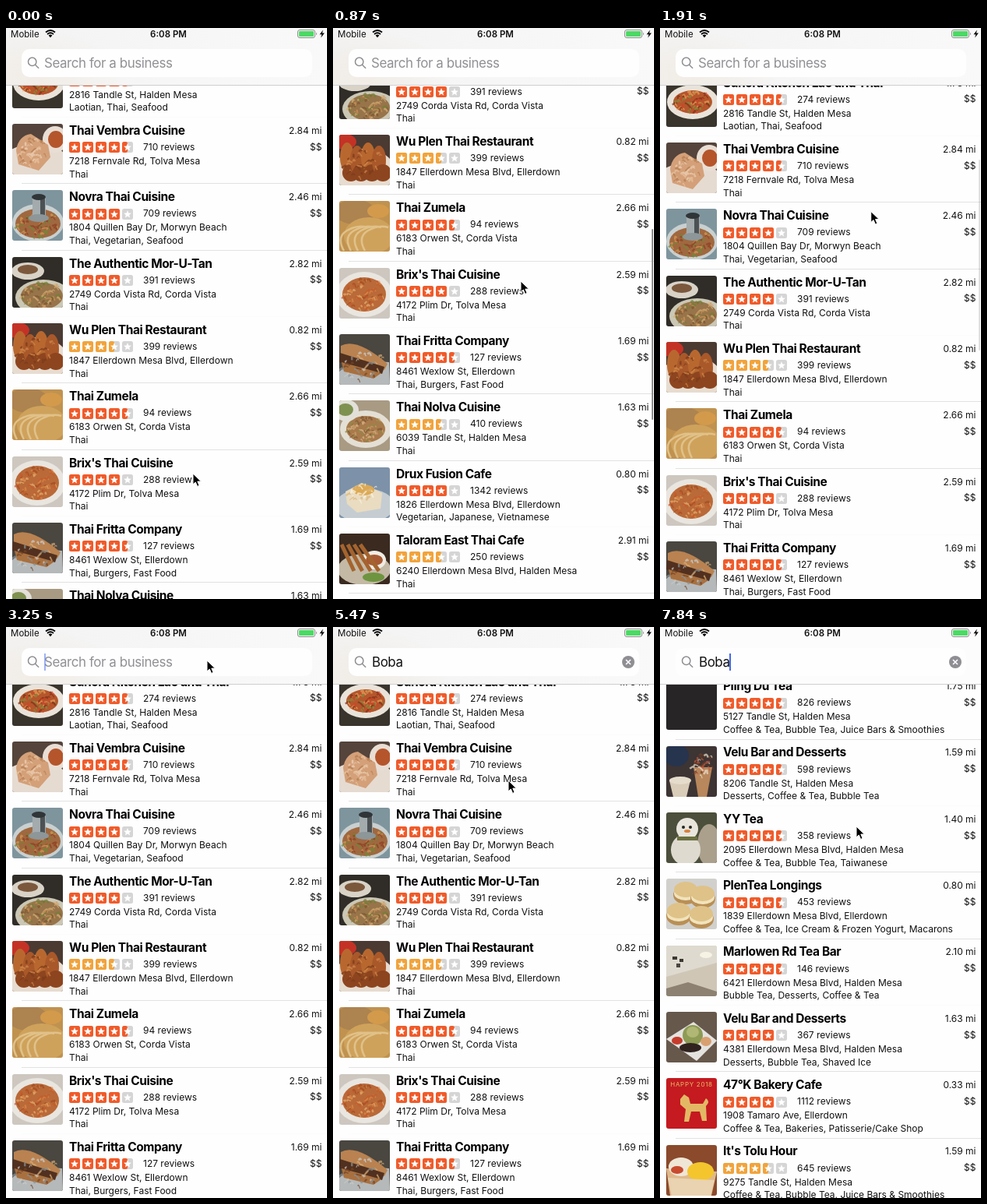
An HTML page for the animation above (7.99 s loop, 412 by 733 pixels).

```html
<!DOCTYPE html>
<html lang="en">
<head>
<meta charset="utf-8">
<title>Business search</title>
<style>
html, body { margin: 0; width: 100%; height: 100%; overflow: hidden; background: #fefefe; }
body { position: relative; font: 12px/20px Inter, Roboto, sans-serif; color: #111; }
body * { box-sizing: border-box; }
.abs, .row, .row > *, #header > * { position: absolute; white-space: pre; }
.row { left: 0; width: 412px; height: 85.333px; }
.thumb { left: 8px; top: 8.8px; width: 65px; height: 65px; border-radius: 3px; overflow: hidden; }
.name { left: 81px; top: 7.6px; font-size: 15.5px; font-weight: 700; letter-spacing: -.42px; color: #000; }
.stars { left: 81px; top: 32px; width: 82px; height: 14px; }
.reviews { left: 176px; top: 28.8px; }
.address { left: 81px; top: 46.8px; }
.kinds { left: 81px; top: 63.3px; }
.miles { right: 6.5px; top: 7.6px; }
.price { right: 6.5px; top: 28.4px; }
.rule { left: 20px; right: 0; height: 1px; background: #e2e2e2; }
#bar { left: 408.5px; width: 2.5px; height: 245px; border-radius: 2px; background: #8c8c8c; }
#header { left: 0; top: 0; width: 412px; height: 74px; border-bottom: 1px solid #cfcfcf; background: #fcfcfc; }
#tint { left: 0; top: 0; width: 412px; height: 73px;
  background: radial-gradient(110px 60px at 40px 62px, #f1ece5, #f1ece500), linear-gradient(90deg, #f3f3f3, #f9f9f9); }
#field { left: 20px; top: 27px; width: 373px; height: 36px; border-radius: 10px; background: #fefefe; }
#hint, #query { left: 50px; top: 33.5px; font-size: 16.9px; line-height: 23px; letter-spacing: -.41px; }
#hint { left: 49px; color: #909095; }
#caret { display: inline-block; width: 2px; height: 22px; margin-left: -1px; vertical-align: top; background: #4468ea; }
</style>
</head>
<body>
<div id="thai" class="abs"></div>
<div id="boba" class="abs"></div>
<div id="bar" class="abs"></div>
<div id="header" class="abs">
  <div id="tint"></div>
  <div id="field"></div>
  <div style="left:6px;top:-2.5px;font-size:11.5px">Mobile</div>
  <div style="left:0;width:417px;top:-2.5px;text-align:center;font-size:11.5px;font-weight:600">6:08 PM</div>
  <svg width="412" height="73" fill="none" style="left:0;top:0">
    <path d="M51 5.5q6-5 12 0M53 8q4-3.4 8 0" stroke="#000" stroke-width="1.8"/>
    <path d="M54.6 9.6q2.4-2 4.8 0L57 12.2z" fill="#000"/>
    <rect x="374.5" y="2.5" width="22" height="10" rx="2.5" stroke="#8a8a8a"/>
    <rect x="376" y="4" width="19" height="7" rx="1.2" fill="#4cd964"/>
    <path d="M398 5.5q2 2 0 4z" fill="#8a8a8a"/>
    <path d="M407 2.5l-4.5 5.7h2.8l-1.1 4.4 4.6-6h-2.9z" fill="#000"/>
    <g stroke="#8e8e93" stroke-width="1.5"><circle cx="33.7" cy="43.3" r="5.2"/><path d="M37.5 47.2l4.6 4.6"/></g>
    <g id="clear"><circle cx="379" cy="45" r="8" fill="#8e8e93"/><path d="M376 42l6 6m0-6l-6 6" stroke="#fff" stroke-width="1.6"/></g>
  </svg>
  <div id="hint">Search for a business</div>
  <div id="query"><span id="typed"></span><i id="caret"></i></div>
</div>
<svg id="cursor" class="abs" width="14" height="20" viewBox="-1 -1 14 20" style="left:-1px;top:-1px">
  <path d="M0 0v14l3.3-3 2.3 5.4 2.5-1-2.3-5.3h4.6z" stroke="#fff"/>
</svg>
<script>
const $ = id => document.getElementById(id);
const LOOP = 7990, STEP = 148, PITCH = 256 / 3, FIRST_TOP = -227.1;

const blob = (fill, x, y, rx, ry = rx) => `<ellipse cx="${x}" cy="${y}" rx="${rx}" ry="${ry}" fill="${fill}"/>`;
const box = (fill, x, y, w, h) => `<rect x="${x}" y="${y}" width="${w}" height="${h}" fill="${fill}"/>`;
const fill = color => box(color, 0, 0, 65, 65);
const shape = (color, d) => `<path d="${d}" fill="${color}"/>`;

// Short curved strokes scattered over an ellipse, coloured in turn.
function strands(colors, x, y, rx, ry, count = 60) {
  let seed = 7, out = '';
  const random = () => (seed = seed * 16807 % 2147483647) / 2147483647;
  random();
  for (let i = 0; i < count; i++) {
    const angle = random() * 6.283, reach = Math.sqrt(random());
    const px = x + Math.cos(angle) * reach * rx, py = y + Math.sin(angle) * reach * ry;
    out += `<path d="M${px} ${py}q${random() * 8 - 4} -4 ${random() * 12 - 6} ${random() * 6 - 2}"
      stroke="${colors[i % colors.length]}" stroke-width="${1 + random() * 1.6}"/>`;
  }
  return `<g fill="none" opacity=".7">${out}</g>`;
}
const dish = (table, plate, food, colors, x = 32, y = 37, rx = 25, ry = 18) =>
  fill(table) + blob(plate, x, y, rx + 8, ry + 7) + blob(food, x, y, rx, ry) + strands(colors, x, y, rx - 2, ry - 2);

const thai = [
  ['Sunora Kitchen Lao and Thai', 4.5, 274, '1.73', '2816 Tandle St, Halden Mesa', 'Laotian, Thai, Seafood',
    dish('#39342c', '#e9e3da', '#b5562c', ['#d8402a', '#e8a35a', '#7d9440', '#7e3018'], 34, 33, 25, 15)],
  ['Thai Vembra Cuisine', 4.5, 710, '2.84', '7218 Fernvale Rd, Tolva Mesa', 'Thai',
    fill('#54443b') + blob('#e6dbd1', 30, 50, 42, 25) + blob('#e9ded4', 55, 20, 16, 17) + blob('#b5552c', 56, 20, 10, 11) +
    shape('#d3a079', 'M5 34Q8 15 24 13L46 27 49 43 34 60 8 52z') + strands(['#e9c5a1', '#b57a4d', '#f0d4ba'], 26, 37, 17, 18, 44)],
  ['Novra Thai Cuisine', 4, 709, '2.46', '1804 Quillen Bay Dr, Morwyn Beach', 'Thai, Vegetarian, Seafood',
    fill('#7f959e') + blob('#c9d0d0', 33, 42, 33, 24) + blob('#a0683f', 33, 43, 29, 19) +
    strands(['#6e8a3a', '#d89a58', '#8c3d24'], 33, 45, 27, 16) + box('#a3abad', 26, 8, 17, 28) + box('#4c5254', 36, 10, 6, 26) +
    blob('#8d9698', 34, 36, 13, 5) + blob('#303538', 34, 9, 9, 4)],
  ['The Authentic Mor-U-Tan', 4, 391, '2.82', '2749 Corda Vista Rd, Corda Vista', 'Thai',
    fill('#302d28') + blob('#d8d2c7', 20, 18, 21, 11) + blob('#7b583c', 20, 16, 13, 6) +
    blob('#cbc7b5', 40, 52, 36, 23) + blob('#98744a', 38, 50, 27, 17) + strands(['#cf9458', '#6f8036', '#7c5530', '#d7b27a'], 38, 49, 26, 16)],
  ['Wu Plen Thai Restaurant', 3.5, 399, '0.82', '1847 Ellerdown Mesa Blvd, Ellerdown', 'Thai',
    fill('#4b3a32') + blob('#e7dcd0', 32, 48, 40, 30) + blob('#c43226', 7, 9, 15, 10) +
    [10, 23, 37, 51].map((x, i) => blob(i % 2 ? '#a9582a' : '#b8682f', x, 29 + i % 2 * 4, 9, 19) + blob('#8d451f', x + 5, 49, 11, 11)).join('') +
    strands(['#d28a4c', '#7a3a1a'], 32, 38, 26, 18, 30)],
  ['Thai Zumela', 4.5, 94, '2.66', '6183 Orwen St, Corda Vista', 'Thai',
    fill('#c0924f') + blob('#ad8350', 20, 14, 26, 16) + blob('#cfa25c', 38, 45, 32, 24) +
    [0, 9, 18, 27].map(x => `<path d="M${x + 6} 64q-10-18 4-26t26-4" fill="none" stroke="#e0c189" stroke-width="2.5"/>`).join('') +
    blob('#d39a4c', 50, 13, 14, 9)],
  ['Brix\'s Thai Cuisine', 4, 288, '2.59', '4172 Plim Dr, Tolva Mesa', 'Thai',
    dish('#cdc7c0', '#e9e5df', '#b96a38', ['#e08a48', '#a44a20', '#e9b273', '#c7592c'], 32, 34, 28, 22)],
  ['Thai Fritta Company', 4.5, 127, '1.69', '8461 Wexlow St, Ellerdown', 'Thai, Burgers, Fast Food',
    fill('#4a4640') + shape('#b5b9ba', 'M0 48L18 33 64 36 65 65H0z') + shape('#b98250', 'M2 15Q22 4 62 38L58 46 2 27z') +
    shape('#51301f', 'M1 24L58 42 55 51 0 36z') + shape('#a9703f', 'M3 36L54 50 44 57 6 48z') +
    strands(['#dfb27a', '#ccc', '#724326', '#8a9092'], 32, 42, 30, 18, 34)],
  ['Thai Nolva Cuisine', 3.5, 410, '1.63', '6039 Tandle St, Halden Mesa', 'Thai',
    dish('#a99a83', '#e4dfd4', '#a87a4c', ['#cda06a', '#7e5634', '#ddb98a', '#8e8a4a'], 34, 37, 25, 17) + blob('#e2e0d8', 9, 13, 16, 14) + blob('#7f9150', 8, 12, 10, 8)],
  ['Drux Fusion Cafe', 4, 1342, '0.80', '1826 Ellerdown Mesa Blvd, Ellerdown', 'Vegetarian, Japanese, Vietnamese',
    fill('#7d92a8') + blob('#c5cdd2', 33, 49, 38, 22) + shape('#e9dcc1', 'M8 31L29 20 55 33 53 53 23 58 10 47z') +
    blob('#dca954', 31, 29, 14, 7) + strands(['#fbf6e4', '#dcb77a'], 31, 33, 19, 11, 24)],
  ['Taloram East Thai Cafe', 3.5, 250, '2.91', '6240 Ellerdown Mesa Blvd, Halden Mesa', 'Thai',
    fill('#3a2a20') + blob('#c3b9a5', 32, 46, 34, 20) + blob('#f0ece4', 45, 34, 15, 12) + blob('#a85a34', 45, 34, 11, 7) +
    [0, 8, 16, 24].map(x => `<path d="M${x + 3} 14l${16 + x / 3} 34" stroke="#a4642f" stroke-width="5"/>`).join('') + blob('#6e9440', 44, 56, 14, 6)],
];

const boba = [
  ['Pling Du Tea', 4.5, 826, '1.75', '5127 Tandle St, Halden Mesa', 'Coffee & Tea, Bubble Tea, Juice Bars & Smoothies', fill('#272525')],
  ['Velu Bar and Desserts', 4.5, 598, '1.59', '8206 Tandle St, Halden Mesa', 'Desserts, Coffee & Tea, Bubble Tea',
    fill('#3d3434') + blob('#27344e', 13, 12, 16, 14) + shape('#d9ccb8', 'M4 44h27l-5 21H9z') + blob('#e6dccb', 18, 44, 14, 5) +
    shape('#b8875c', 'M35 27h24l-7 38H41z') + strands(['#eee2cf', '#6d3c25', '#c45b3c'], 47, 25, 13, 14, 35)],
  ['YY Tea', 4.5, 358, '1.40', '2095 Ellerdown Mesa Blvd, Halden Mesa', 'Coffee & Tea, Bubble Tea, Taiwanese',
    fill('#4b4f3b') + blob('#aaa08c', 55, 42, 15, 27) + blob('#dedacf', 25, 48, 19, 20) + blob('#e8e5dc', 27, 21, 14, 14) +
    box('#6b7040', 14, 31, 26, 5) + blob('#252521', 22, 19, 2) + blob('#252521', 31, 19, 2) + blob('#d7823c', 27, 24, 4, 2)],
  ['PlenTea Longings', 4.5, 453, '0.80', '1839 Ellerdown Mesa Blvd, Ellerdown', 'Coffee & Tea, Ice Cream & Frozen Yogurt, Macarons',
    fill('#d1d0cc') + [[25, 17], [47, 22], [16, 44], [45, 48]].map(([x, y]) =>
      blob('#b98f55', x, y + 4, 16, 12) + blob('#f1e3bd', x, y + 2, 15, 9) + blob('#dfc287', x, y - 3, 15, 10)).join('')],
  ['Marlowen Rd Tea Bar', 4.5, 146, '2.10', '6421 Ellerdown Mesa Blvd, Halden Mesa', 'Bubble Tea, Desserts, Coffee & Tea',
    fill('#cfc6b6') + shape('#dedacf', 'M0 0h65v22L0 40z') + box('#3b3833', 8, 14, 6, 4) + box('#3b3833', 17, 17, 5, 4) +
    box('#4a4640', 13, 23, 5, 5) + shape('#8d8272', 'M0 55l28-8 37 12v6H0z') + blob('#f7f3e4', 51, 12, 8, 4)],
  ['Velu Bar and Desserts', 4, 367, '1.63', '4381 Ellerdown Mesa Blvd, Halden Mesa', 'Desserts, Bubble Tea, Shaved Ice',
    fill('#67584c') + shape('#e4e2de', 'M0 35L35 13 65 37 39 63z') + blob('#8d9b54', 34, 30, 13, 13) + blob('#b0b673', 34, 26, 8, 7) +
    blob('#30231f', 31, 46, 14, 6) + blob('#c53c2b', 14, 37, 7, 5) + blob('#d8a070', 51, 38, 7, 6)],
  ['47°K Bakery Cafe', 4, 1112, '0.33', '1908 Tamaro Ave, Ellerdown', 'Coffee & Tea, Bakeries, Patisserie/Cake Shop',
    fill('#c41a20') + '<text x="32.5" y="11" text-anchor="middle" font-size="8" letter-spacing=".7" fill="#e5bd6a">HAPPY 2018</text>' +
    shape('#e3b865', 'M18 27l5-6 6 4 2 8h16l4-7q6 4 0 10l1 19h-6l-3-12H32l-3 13h-6l2-16-7-6z')],
  ['It\'s Tolu Hour', 3.5, 645, '1.59', '9275 Tandle St, Halden Mesa', 'Coffee & Tea, Bubble Tea, Juice Bars & Smoothies',
    fill('#8b4a2c') + shape('#dfb98c', 'M0 30l65 4-7 31H5z') + blob('#efe6d6', 19, 28, 16, 12) + blob('#f4c52c', 44, 34, 17, 12) +
    blob('#c84b2e', 14, 32, 8, 5) + shape('#e9d3b0', 'M2 42l60 3-5 20H7z')],
  ['The Valdo Coffee House', 4.5, 274, '0.20', '9718 Norvane Ave, Ellerdown', 'Coffee & Tea',
    fill('#3b332c') + shape('#9db4bf', 'M0 0h30L18 20 0 24z') + box('#98653c', 0, 25, 43, 16) + box('#5d4835', 0, 42, 65, 23) +
    strands(['#d8b88b', '#1e1e1d', '#7b94a2'], 33, 39, 30, 21, 32)],
  ['Quanti Tea', 3.5, 544, '1.53', '8315 Tandle St, Halden Mesa', 'Tea Rooms, Chinese, Bubble Tea',
    dish('#75705c', '#e8e6e0', '#a34f2c', ['#ce6b38', '#6d2d18', '#7d9640', '#e4a468'], 34, 39, 23, 14) + blob('#e8e5dc', 14, 10, 16, 9)],
  ['-38°K Frostpetal', 4.5, 148, '1.66', '5982 Tandle St, Halden Mesa', 'Ice Cream & Frozen Yogurt, Shaved Ice, Bubble Tea',
    fill('#68513d') + shape('#dcd2c4', 'M0 37L34 20 65 40 36 65z') + shape('#c6974f', 'M11 27L35 16 55 28 49 50 30 57 13 46z') +
    shape('#a2713b', 'M11 27l20 11-1 19-17-11z') + blob('#f0dfb9', 32, 25, 12, 7) + blob('#3a2a24', 33, 18, 5, 4)],
];

const starPoints = Array.from({ length: 10 }, (_, i) => {
  const radius = i % 2 ? 2.3 : 5.2, angle = i * Math.PI / 5;
  return `${7 + radius * Math.sin(angle)},${7.3 - radius * Math.cos(angle)}`;
}).join(' ');

function stars(rating) {
  const color = rating < 4 ? '#f2a33a' : '#f15a29';
  return [0, 1, 2, 3, 4].map(i => {
    const part = Math.max(0, Math.min(1, rating - i));
    return `<g transform="translate(${i * 17})"><rect width="14" height="14" rx="2.5" fill="#d5d5d5"/>
      <rect width="${14 * part}" height="14" rx="2.5" fill="${color}"/><polygon points="${starPoints}" fill="#fff"/></g>`;
  }).join('');
}

function buildList(id, items, firstIndex) {
  $(id).innerHTML = items.map(([name, rating, reviews, miles, address, kinds, photo], i) =>
    `<div class="row" style="top:${(firstIndex + i) * PITCH}px">
      <svg class="thumb" viewBox="0 0 65 65">${photo}</svg>
      <b class="name">${name}</b><svg class="stars">${stars(rating)}</svg>
      <span class="reviews">${reviews} reviews</span><span class="address">${address}</span>
      <span class="kinds">${kinds.replace(/&/g, '&amp;')}</span>
      <span class="miles">${miles} mi</span><span class="price">$$</span>
      <div class="rule" data-index="${firstIndex + i}"></div></div>`).join('');
}
buildList('thai', thai, 3);
buildList('boba', boba, 0);

// Eased value at a step, from [step, value] pairs.
function track(step, keys) {
  if (step <= keys[0][0]) return keys[0][1];
  for (let i = 1; i < keys.length; i++) {
    const [a, from] = keys[i - 1], [b, to] = keys[i];
    if (step <= b) {
      const u = (step - a) / (b - a);
      return from + (to - from) * u * u * (3 - 2 * u);
    }
  }
  return keys[keys.length - 1][1];
}

const SCROLL = [[1, 0], [6, -242], [9, 8 / 3], [13, 24], [49, 24], [53, 857 / 3]];
const CURSOR_X = [[1, 240], [6, 241], [9, 270], [15, 271], [17, 271], [19, 258], [33, 258], [37, 225],
  [41, 232], [44, 352], [46, 337], [49, 262], [53, 252]];
const CURSOR_Y = [[1, 572], [6, 325], [9, 586], [10, 588], [15, 44], [19, 43], [33, 43], [37, 197],
  [41, 184], [44, 95], [46, 67], [49, 98], [53, 256]];
const BAR_OPACITY = [[1, 0], [2, 1], [11, 1], [14, 0]];
const TINT_OPACITY = [[50, 1], [53, 0]];
const KEY_STEPS = [25, 27, 29, 31];

function caretOpacity(step) {
  if (step < 19) return 0;
  const reset = [19, ...KEY_STEPS].filter(s => s <= step).pop();
  const phase = (step - reset) % 6.76;
  return phase < 3 ? 1 : phase < 4 ? .5 : 0;
}

function draw(time) {
  const step = Math.min(53, Math.floor((time + 18) / STEP));
  const thirds = Math.round(track(step, SCROLL) * 3);
  const top = FIRST_TOP + thirds / 3;
  const showBoba = step >= 39;
  $('thai').style.display = showBoba ? 'none' : '';
  $('boba').style.display = showBoba ? '' : 'none';
  const list = $(showBoba ? 'boba' : 'thai');
  list.style.top = top + 'px';
  // Hairlines drop out on one pixel phase in three.
  for (const rule of list.querySelectorAll('.rule')) {
    const index = +rule.dataset.index, rowTop = top + index * PITCH;
    rule.style.top = Math.round(rowTop + PITCH - .3) - rowTop + 'px';
    rule.style.opacity = (index + thirds) % 3 ? 1 : .12;
  }
  $('bar').style.top = 176.9 - thirds / 9 + 'px';
  $('bar').style.opacity = track(step, BAR_OPACITY);
  $('tint').style.opacity = track(step, TINT_OPACITY);

  const typed = 'Boba'.slice(0, KEY_STEPS.filter(s => s <= step).length);
  $('typed').textContent = typed;
  $('hint').style.opacity = typed ? 0 : 1;
  $('clear').style.opacity = track(step, [[24, 0], [26, 1]]);
  $('caret').style.opacity = caretOpacity(step);
  $('cursor').style.transform = `translate(${track(step, CURSOR_X)}px, ${track(step, CURSOR_Y)}px)`;
}

const start = performance.now();
function tick() {
  draw((performance.now() - start) % LOOP);
  requestAnimationFrame(tick);
}
tick();
</script>
</body>
</html>
```
